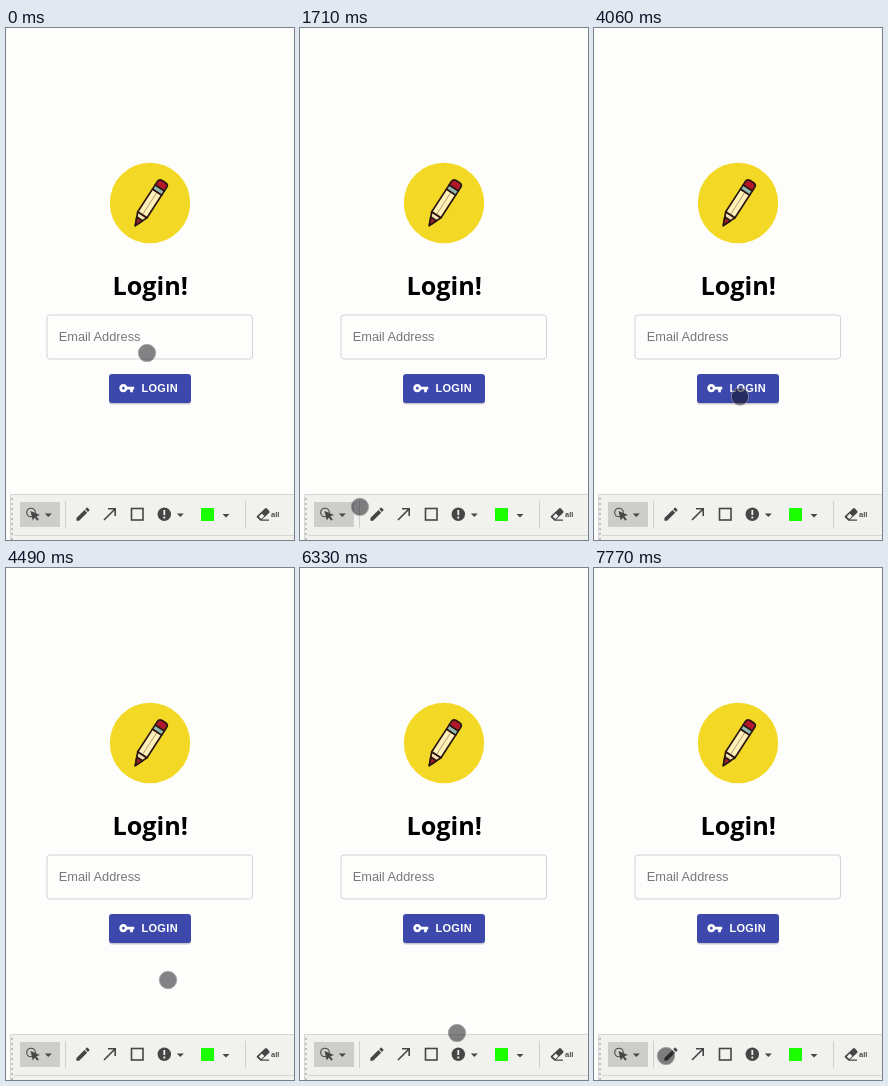
Animation of 288 by 512 pixels, one loop 8000 ms. Source, as an HTML page:

```html
<!DOCTYPE html>
<html lang="en">
<head>
<meta charset="utf-8">
<title>Login</title>
<style>
  html, body { margin: 0; height: 100%; overflow: hidden; background: #fdfdfc; }
  svg { display: block; width: 288px; height: 512px; }
  text { font-family: "Liberation Sans", Arial, sans-serif; }
  .title { font: 700 25.2px "Open Sans", "Noto Sans", sans-serif; }
  .icon { fill: #464646; }
  .line { fill: none; stroke: #464646; stroke-width: 1.6; }
</style>
</head>
<body>
<svg viewBox="0 0 288 512">
  <defs><path id="caret" d="M-3.5 -1.5h7L0 2z"/></defs>

  <circle cx="144" cy="175" r="40.2" fill="#f3d926"/>
  <g transform="translate(144 175) rotate(33)" stroke="#2b1712" stroke-width="1.7" stroke-linejoin="round">
    <path d="M-5.5 14L0 27L5.5 14z" fill="#f6dfb0"/>
    <path d="M-3.4 19L0 27L3.4 19z" fill="#a3202c"/>
    <path d="M-5.5 -13h11v27h-11z" fill="#fff0b8"/>
    <path d="M0 -12v25" stroke-width=".8" stroke="#a8926a"/>
    <path d="M-5.5 -18h11v5h-11z" fill="#93bcb0"/>
    <path d="M-5.5 -18v-4q0 -3.5 3.5 -3.5h4q3.5 0 3.5 3.5v4z" fill="#b3182a"/>
  </g>

  <text class="title" x="144.2" y="267" text-anchor="middle">Login!</text>

  <rect x="41" y="287" width="205.5" height="44" rx="3" fill="none" stroke="#d2d2da"/>
  <text x="52.7" y="313" font-size="12.8" fill="#78787a">Email Address</text>

  <rect x="103" y="347.5" width="82" height="29" rx="3" fill="#bcbcc4" opacity=".8"/>
  <rect x="103" y="346" width="82" height="29" rx="3" fill="#3c48ac"/>
  <path transform="translate(112.6 352) scale(.68)" fill="#fff" d="M12.65 10C11.83 7.67 9.61 6 7 6c-3.31 0-6 2.69-6 6s2.69 6 6 6c2.61 0 4.83-1.67 5.65-4H17v4h4v-4h2v-4zM7 14a2 2 0 1 1 0-4a2 2 0 1 1 0 4z"/>
  <text x="135.4" y="364" font-size="11" font-weight="700" letter-spacing=".35" fill="#fff">LOGIN</text>

  <rect x="4" y="466" width="284" height="46" fill="#f1f1ee"/>
  <path d="M4.5 512V466.5H288M8 507.5H288" fill="none" stroke="#d6d6d6"/>
  <path d="M6 470V512" stroke="#c0c0c0" stroke-width="2" stroke-dasharray="2 3"/>
  <rect x="14" y="474" width="40" height="25" fill="#cdcdca"/>
  <path d="M59.5 473v27M239.5 473v27" stroke="#cfcfcd"/>

  <circle cx="25" cy="484.5" r="4.3" class="line" style="stroke-width:1.1"/>
  <path class="icon" d="M24.5 483L34 487L30.3 488.3L32.8 491.5L31.3 492.7L28.8 489.5L26.8 492.5z"/>
  <path class="icon" transform="translate(68.2 477.4) scale(.73)" d="M3 17.25V21h3.75L17.81 9.94l-3.75-3.75zM20.71 7.04a1 1 0 0 0 0-1.41l-2.34-2.34a1 1 0 0 0-1.41 0l-1.83 1.83 3.75 3.75z"/>
  <path class="line" d="M98 492L109 481M102 480.8H109.2V488"/>
  <rect class="line" x="125.5" y="480.5" width="11.5" height="11.5"/>
  <circle class="icon" cx="158.3" cy="486.3" r="6.7"/>
  <path d="M158.3 482v5M158.3 488.6v2" stroke="#f1f1ee" stroke-width="1.8"/>
  <rect x="195" y="480" width="13" height="13" fill="#1cff00"/>
  <g class="icon">
    <use href="#caret" x="42.3" y="487"/>
    <use href="#caret" x="174.3" y="487"/>
    <use href="#caret" x="220" y="487.5"/>
    <path d="M251 488L259 480.5Q260 479.7 261 480.6L263.2 483Q264 484 263 485L256 491.6H263V492.8H254.5L251 489.6Q250.3 488.8 251 488zM252.8 488.8L255.3 491L258.4 488L255.7 485.5z" fill-rule="evenodd"/>
    <text x="265" y="489.3" font-size="7.5" font-weight="700">all</text>
  </g>

  <circle id="pointer" r="8.7" fill="#141418" fill-opacity=".52" stroke="#a0a0a4" stroke-opacity=".7"/>
</svg>
<script>
const LOOP = 8000, STEP = 80;
// Pointer stops: departure, arrival, x, y
const stops = [
  [0, 0, 141, 325],
  [80, 400, 61, 503],
  [820, 1000, 50, 492],
  [1630, 2280, 145, 366],
  [4060, 4490, 162, 412],
  [4750, 5150, 171, 431],
  [5670, 5920, 180, 466],
  [6070, 6330, 157, 465],
  [6760, 6870, 184, 489],
  [7290, 7770, 72, 488]
];
const pointer = document.getElementById("pointer");
const ease = p => p * p * (3 - 2 * p);

// Share of a move done at time t, advancing in even steps
function progress(t, from, to) {
  if (t >= to) return 1;
  const gaps = Math.ceil((to - from) / STEP);
  const step = Math.floor((t - from) / (to - from) * gaps) + 1;
  return ease(step / (gaps + 1));
}

function pointerAt(t) {
  let x = 0, y = 0;
  for (const [from, to, endX, endY] of stops) {
    if (t < from) break;
    const p = progress(t, from, to);
    x += (endX - x) * p;
    y += (endY - y) * p;
  }
  return [x, y];
}

const began = performance.now();
function draw(now) {
  const [x, y] = pointerAt(Math.max(0, now - began) % LOOP);
  pointer.setAttribute("cx", x);
  pointer.setAttribute("cy", y);
  requestAnimationFrame(draw);
}
draw(began);
</script>
</body>
</html>
```
